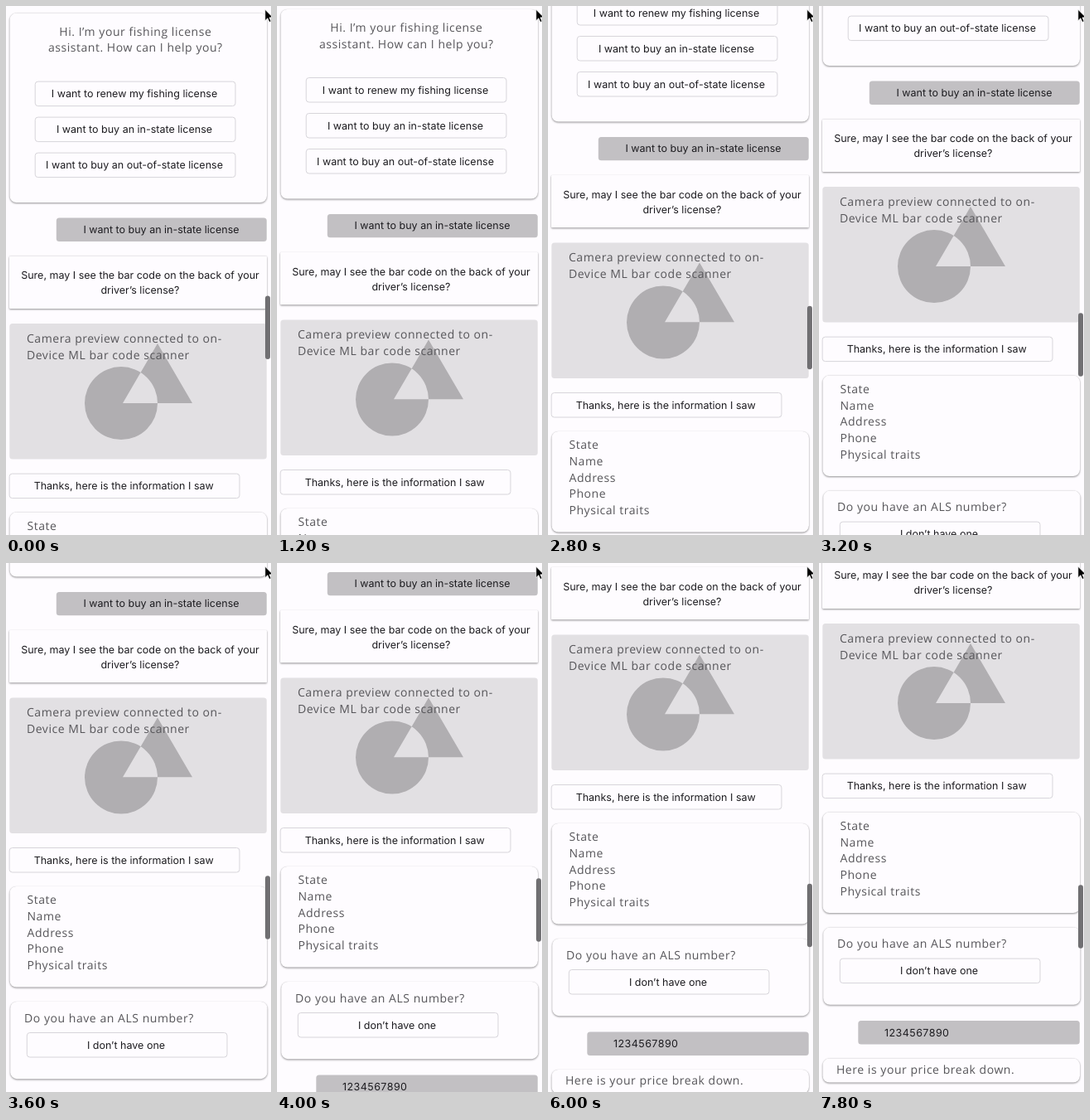
Write an HTML page that moves like this. It is 320x638 px and loops after 8 s.

```html
<!DOCTYPE html>
<html lang="en">
<head>
<meta charset="utf-8">
<title>License assistant chat</title>
<style>
  html, body { margin: 0; width: 100%; height: 100%; overflow: hidden; background: #fefcff; }
  svg { display: block; width: 100%; height: 100%; }
  text { text-rendering: geometricPrecision; white-space: pre; }
  .ui { font: 12.5px Inter, "Liberation Sans", sans-serif; fill: #1d1c20; }
  .body { font: 14px "Open Sans", "Noto Sans", sans-serif; letter-spacing: .54px; fill: #57565a; }
  .digits { letter-spacing: .45px; }
  .mid { text-anchor: middle; }
  .card { fill: #fefcff; filter: drop-shadow(0 1px 1px rgba(0,0,0,.38)) drop-shadow(0 0 .5px rgba(0,0,0,.16)); }
  .outline { fill: #fefcff; stroke: #d7d5da; }
  .reply { fill: #c2c0c3; }
  .camera { fill: #e2e0e3; }
  .shapes { fill: #b0aeb1; fill-rule: evenodd; }
</style>
</head>
<body>
<svg viewBox="0 0 320 638">
  <g id="page"></g>
  <rect id="thumb" x="313" width="6" height="76.5" rx="3" fill="#706f72"/>
  <path d="M312.8 4.2v13.6l3.1-3 2 4.7 2.2-1-2-4.6h4.3z" fill="#000" stroke="#fff" stroke-width=".8"/>
</svg>
<script>
const LOOP = 8000;
const page = document.getElementById('page');
const thumb = document.getElementById('thumb');

function add(tag, attrs, content = '') {
  const node = document.createElementNS('http://www.w3.org/2000/svg', tag);
  for (const key in attrs) node.setAttribute(key, attrs[key]);
  node.textContent = content;
  page.append(node);
}
const box = (kind, x, y, right, bottom, rx) =>
  add('rect', { class: kind, x, y, width: right - x, height: bottom - y, rx });
const label = (kind, x, y, content) => add('text', { class: kind, x, y }, content);
function button(x, y, right, textX, content) {
  box('outline', x, y, right, y + 29.5, 3.5);
  label('ui mid', textX, y + 19, content);
}

// Greeting
box('card', 4.5, 9, 315, 237.5, 8);
label('body mid', 156.3, 36, 'Hi. I’m your fishing license');
label('body mid', 156.3, 55.8, 'assistant. How can I help you?');
button(35.2, 91.5, 277, 155, 'I want to renew my fishing license');
button(35.2, 134.5, 277, 155, 'I want to buy an in-state license');
button(35.2, 177.5, 277, 155, 'I want to buy an out-of-state license');

// License scan
box('reply', 60.8, 256, 314.8, 284.3, 3.5);
label('ui mid', 187.5, 274.2, 'I want to buy an in-state license');
box('card', 4, 302, 315, 365.3, 1);
label('ui mid', 162, 329.9, 'Sure, may I see the bar code on the back of your');
label('ui mid', 162, 347.9, 'driver’s license?');
box('camera', 4.3, 383.5, 314.8, 547, 3.5);
add('path', { class: 'shapes', d: 'M95 479.5a44 44 0 1 0 88 0a44 44 0 1 0-88 0zM183 407.5L225 479.3H141z' });
label('body', 25, 406.4, 'Camera preview connected to on-');
label('body', 25, 426.1, 'Device ML bar code scanner');

// Scan result
button(4.1, 564.5, 282, 142.2, 'Thanks, here is the information I saw');
box('card', 4.5, 611, 315, 732.5, 8);
['State', 'Name', 'Address', 'Phone', 'Physical traits'].forEach((field, i) =>
  label('body', 25.5, 632.4 + i * 19.65, field));

// ALS number and price
box('card', 5.2, 750, 315.5, 843.2, 8);
label('body', 22, 774.9, 'Do you have an ALS number?');
button(25.3, 787.5, 267, 145, 'I don’t have one');
box('reply', 47.3, 862.4, 314.8, 891, 3.5);
label('ui digits', 79, 881, '1234567890');
box('card', 4.5, 908, 315, 937, 8);
label('body', 21, 926.2, 'Here is your price break down.');

// [time, scroll offset] and [time, scrollbar opacity], each held until the next
const scrollSteps = [
  [0, .4], [200, 5], [2400, 15.4], [2600, 65], [2800, 98], [3000, 125],
  [3200, 165.4], [3400, 195], [3600, 221], [3800, 236], [4000, 245],
  [5200, 249.4], [5400, 270], [5600, 285], [5800, 292], [6000, 297],
  [6200, 302], [7800, 310.4]
];
const barSteps = [
  [0, 1], [1000, .4], [1200, 0], [2400, 1], [4800, .4], [5000, 0],
  [5200, 1], [7000, 0], [7800, 1]
];
const valueAt = (steps, time) => steps.findLast(([start]) => start <= time)[1];

function draw(now) {
  const time = Math.max(0, now) % LOOP;
  const scroll = valueAt(scrollSteps, time);
  page.setAttribute('transform', `translate(0 ${-scroll})`);
  thumb.setAttribute('y', 349.5 + scroll * .125);
  thumb.setAttribute('opacity', valueAt(barSteps, time));
}

const begin = performance.now();
function tick() {
  draw(performance.now() - begin);
  requestAnimationFrame(tick);
}
tick();
</script>
</body>
</html>
```
